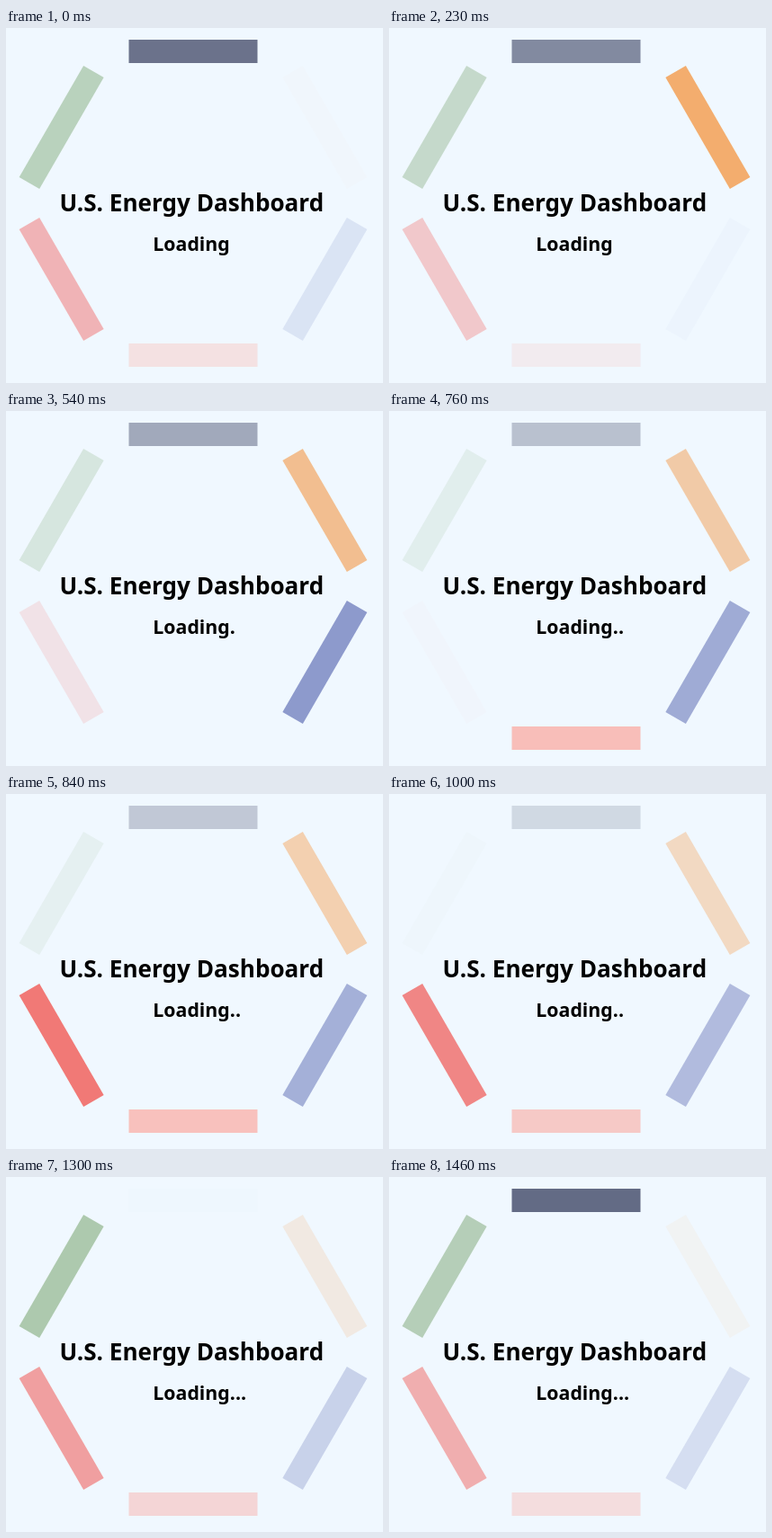
An HTML page with a canvas that plays this animation: 419x395 px, repeating every 1610 ms.

```html
<!DOCTYPE html>
<html lang="en">
<head>
<meta charset="utf-8">
<title>Loading</title>
<style>
  html, body { margin: 0; width: 100%; height: 100%; overflow: hidden; background: #f0f8ff; }
  canvas { display: block; }
</style>
</head>
<body>
<canvas id="stage" width="419" height="395"></canvas>
<script>
const ctx = document.getElementById('stage').getContext('2d');
const LOOP = 1610;
const FADE = 1537;
const FIRST = 1311; // when the top bar lights up
const FONT = '"Noto Sans", "Open Sans", sans-serif';

// Clockwise from the top
const COLORS = [
  'rgb(85,92,120)', 'rgb(244,162,89)', 'rgb(123,136,194)',
  'rgb(250,181,174)', 'rgb(241,118,115)', 'rgb(161,192,159)'
];

// Step lengths in units of 10 ms; the last step holds until the loop ends
const STEPS = [...'7888878787888788788'].map(Number);

function stepAt(ms) {
  let start = 0, k = 0;
  while (k < STEPS.length && start + STEPS[k] * 10 <= ms) start += STEPS[k++] * 10;
  return { k, start };
}

function drawBar(i, time) {
  const age = (time - FIRST - i * FADE / 6 + 2 * FADE) % FADE;
  ctx.save();
  ctx.translate(208, 195);
  ctx.rotate(i * Math.PI / 3);
  ctx.globalAlpha = 1 - age / FADE;
  ctx.fillStyle = COLORS[i];
  ctx.fillRect(-71.5, -182, 143, 26);
  ctx.restore();
}

function drawText(text, x, y, size) {
  ctx.font = `bold ${size}px ${FONT}`;
  ctx.fillStyle = '#000';
  ctx.fillText(text, x, y);
}

function draw(now) {
  const { k, start } = stepAt(now % LOOP);
  ctx.fillStyle = '#f0f8ff';
  ctx.fillRect(0, 0, 419, 395);
  COLORS.forEach((_, i) => drawBar(i, start));
  drawText('U.S. Energy Dashboard', 59.6, 204, 26.1);
  drawText('Loading' + '.'.repeat(Math.floor(k / 5)), 163.3, 248, 21.3);
}

const begin = performance.now();
function tick() {
  draw(performance.now() - begin);
  requestAnimationFrame(tick);
}
tick();
</script>
</body>
</html>
```
